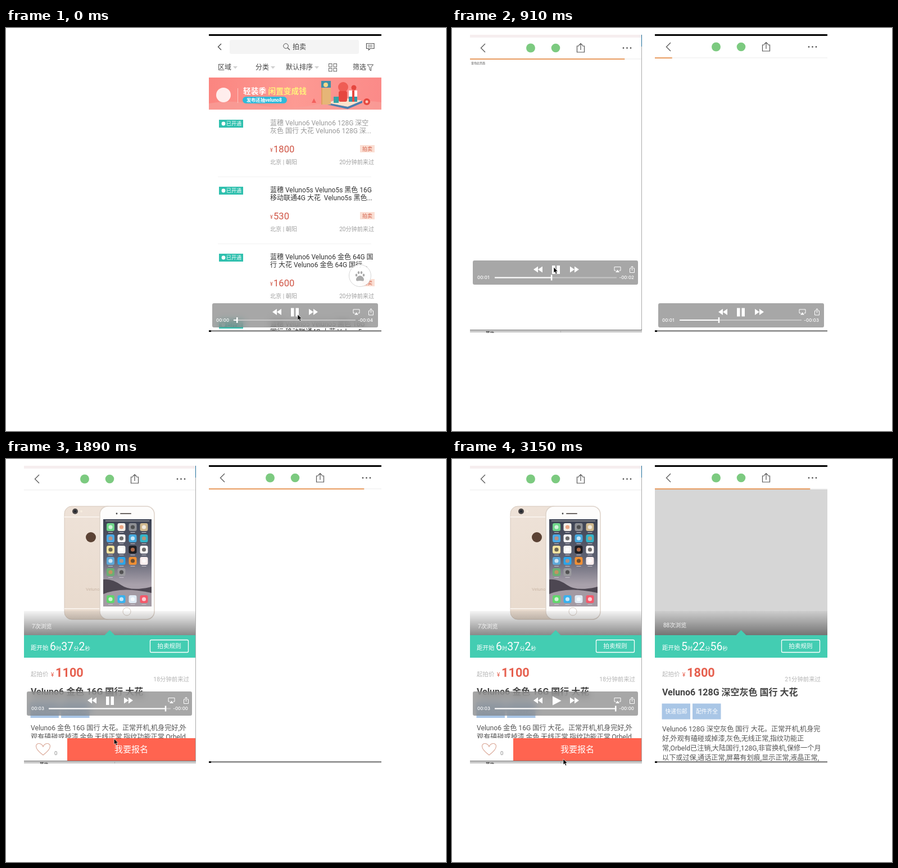
Animation, 783 px wide and 716 px high, one loop 4.15 s. Source, as an HTML page:

```html
<!DOCTYPE html>
<html lang="zh-CN">
<head>
<meta charset="utf-8">
<title>拍卖页面加载对比</title>
<style>
  html, body { margin: 0; width: 100%; height: 100%; overflow: hidden; background: #fff; }
  svg { position: absolute; left: 0; top: 0; display: block; }
  text { font-family: Roboto, 'Noto Sans CJK SC', 'Noto Sans CJK', sans-serif; white-space: pre; }
  .time { font-family: Inter, Roboto, sans-serif; font-weight: 500; }
  .glass { position: absolute; width: 294px; height: 43px; border-radius: 3px;
    background: rgba(118, 118, 118, .64); backdrop-filter: blur(7px); }
</style>
</head>
<body>
<svg id="back" width="783" height="716" viewBox="0 0 783 716"></svg>
<div class="glass" id="glassL" style="left:37px;top:413px"></div>
<div class="glass" id="glassR" style="left:366.5px;top:488.5px;width:295.5px"></div>
<svg id="front" width="783" height="716" viewBox="0 0 783 716"></svg>
<script>
const LOOP = 4150, STEP = 70, W = 307;
const $ = id => document.getElementById(id);

// Shape helpers; text takes the vertical centre of its line
const T = (x, y, size, fill, str, extra = '') =>
  `<text x="${x}" y="${(y + size * .37).toFixed(2)}" font-size="${size}" fill="${fill}" ${extra}>${str}</text>`;
const R = (x, y, w, h, fill, extra = '') =>
  `<rect x="${x}" y="${y}" width="${w}" height="${h}" fill="${fill}" ${extra}/>`;
const C = (x, y, r, fill, extra = '') => `<circle cx="${x}" cy="${y}" r="${r}" fill="${fill}" ${extra}/>`;
const P = (d, fill, extra = '') => `<path d="${d}" fill="${fill}" ${extra}/>`;
const L = (d, color, w = 1.2) => P(d, 'none', `stroke="${color}" stroke-width="${w}"`);
const G = (x, y, body, extra = '') => `<g transform="translate(${x} ${y})" ${extra}>${body}</g>`;
const END = 'text-anchor="end"', MID = 'text-anchor="middle"', BOLD = 'font-weight="700"';

// Listing screen
function banner() {
  return R(0, 88, W, 57, 'url(#pink)') +
    P('M0 145V134Q45 126 90 137T190 136T307 132V145Z', '#f8a09a', 'opacity=".7"') +
    C(26, 119, 13, '#fff', 'opacity=".85"') + L('M51.5 107V133', '#fdc5bf', 1) +
    T(61, 112, 13.7, '#fff', '轻装季 <tspan fill="#fff07c">闲置变成钱</tspan>', BOLD) +
    R(60, 122, 79, 12, '#2fb9d9', 'rx="6"') + T(67, 128, 8.3, '#fff', '发布还抽veluno8', BOLD) +
    P('M183 133l4-8 4 8z', '#f2605c') +
    P('M211 133l26-9 36 5-26 11z', '#fbe3cd') + P('M211 133l36 7 26-11v4l-26 11-36-8z', '#4b7fae') +
    L('M201 136V96H216', '#d9a04e', 1.5) + R(202, 107, 15, 29, '#e6b577') + R(200, 94, 17, 12, '#3f8fa8') +
    C(208, 101, 4, '#f7d98a') + C(239, 105, 9, '#ef5d55') + R(231, 112, 15, 19, '#e6473f', 'rx="3"') +
    R(222, 122, 9, 11, '#35a3a5') + R(249, 111, 15, 11, '#fff') + R(249, 122, 15, 9, '#2f98a8') +
    R(255, 111, 4, 20, '#e6473f') + C(258, 106, 4.5, '#e6473f') +
    C(281, 131, 6, '#e6473f') + C(281, 131, 2.5, '#f9c3b6');
}

function item(i, first, second, price) {
  const ink = i ? '#333' : '#999';
  return G(0, i * 119,
    R(18, 163, 43, 14, '#2fc0ae') + C(26, 170, 3.4, '#fff') + T(31, 170, 9, '#fff', '已开通') +
    T(109, 169, 12, ink, first) + T(109, 183, 12, ink, second) +
    T(109, 217, 9, '#cf5444', '¥') + T(115, 215, 16.6, '#cf5444', price) +
    R(269, 208, 26, 13, '#fbdfd4') + T(282, 214.5, 9, '#d2624b', '拍卖', MID) +
    T(109, 238, 10.1, '#a0a0a0', '北京 | 朝阳') + T(294, 238, 10.1, '#a0a0a0', '20分钟前来过', END) +
    R(16, 264, 273, 1, '#f2f2f2'));
}

function listing() {
  const caret = x => P(`M${x - 4} 68h8l-4 4.5z`, '#d0d0d0');
  const cell = (x, y) => R(x, y, 5.5, 5.5, 'none', 'stroke="#666"');
  const paw = C(269, 440, 19.5, '#fff', 'stroke="#d2d2d2" opacity=".93"') +
    P('M269 440c4 0 7 4 7 7 0 4-4 2-7 2s-7 2-7-2c0-3 3-7 7-7z', '#aaa') +
    [[-6.5, -1], [-2.5, -5.5], [2.5, -5.5], [6.5, -1]]
      .map(([x, y]) => `<ellipse cx="${269 + x}" cy="${440 + y}" rx="1.8" ry="2.6" fill="#aaa"/>`).join('');
  return R(0, 12, W, 525, '#fff') + L('M22 28l-5.500 5.500 5.500 5.500', '#444', 1.3) +
    R(37, 21, 230, 25, '#f4f4f4', 'rx="3"') + C(137, 32, 4.3, 'none', 'stroke="#555"') +
    L('M140 35l4 4', '#555') + T(149, 33.5, 12, '#444', '拍卖') +
    L('M280.500 27.500h13.500v9h-7l-2.500 2.500v-2.500h-4zM283 30.500h8M283 33.500h8', '#555') +
    T(16, 70, 12, '#444', '区域') + caret(47) + T(83, 70, 12, '#444', '分类') + caret(114) +
    T(137, 70, 12, '#444', '默认排序') + caret(192) +
    cell(213.5, 63.5) + cell(222, 63.5) + cell(213.5, 71.5) + cell(222, 71.5) +
    T(256, 70, 12, '#444', '筛选') + L('M282 65h10.500l-4 5v6l-2.500-2v-4z', '#555', 1) + banner() +
    item(0, '蓝穗 Veluno6 Veluno6 128G 深空', '灰色 国行 大花 Veluno6 128G 深...', '1800') +
    item(1, '蓝穗 Veluno5s Veluno5s 黑色 16G', '移动联通4G 大花  Veluno5s 黑色...', '530') +
    item(2, '蓝穗 Veluno6 Veluno6 金色 64G 国', '行 大花 Veluno6 金色 64G 国行...', '1600') +
    item(3, '蓝穗 Veluno5 Veluno5 黑色 16G', '国行 移动联通4G 大花 Veluno5...', '600') + paw;
}

// Web page parts
function nav() {
  return L('M28 26l-7.500 7.500 7.500 7.500', '#555', 1.3) + C(109, 33.5, 8, '#7cca80') + C(153.5, 33.5, 7.8, '#7cca80') +
    L('M195 30h-3.500v11h13v-11h-3.500M198 37v-11M194.500 29l3.500-3.500 3.500 3.500', '#555', 1.2) +
    [274, 280.5, 287].map(x => C(x, 33.5, 1.3, '#444')).join('') + R(0, 52.5, W, 1, '#ececec');
}

function phone() {
  const colors = ['#6fd68a', '#f3efe9', '#8e9094', '#cfb98f', '#4aa9e6', '#f5f5f5', '#45a8dd', '#32b5c9',
    '#f4e3a0', '#f7f7f4', '#1d1d22', '#faf6f4', '#5fa9d8', '#2aa5ea', '#ef8f35', '#f9eeee', '#6cae74', '#9a9a9e'];
  const dock = ['#62d66c', '#39b1ee', '#dfeaf4', '#f4596b'];
  const marks = ['#fff', '#e8895a', '#333'];
  const xs = [186, 205.5, 225.5, 245.5];
  const app = (x, y, c, mark) => R(x - 7, y - 7, 14, 14, c, 'rx="3.2"') +
    C(x, y, 3.6, mark, 'opacity=".7"') + R(x - 4, y + 9, 8, 1, '#c8c4cc');
  return R(104, 84, 90, 201, 'url(#gold)', 'rx="13" stroke="#d6c8bc"') +
    R(104, 102, 90, 2, '#f8f1eb') + R(104, 265, 90, 2, '#f8f1eb') +
    C(123, 93, 5, '#4b4747') + C(123, 93, 2.3, '#22262f') + C(134, 93, 2, '#f7eee0') +
    C(151, 139, 9, '#5b4234') + T(142, 231, 8, '#c9b6a6', 'Veluno') +
    R(167, 84, 97, 201, '#fdfcfb', 'rx="14" stroke="#ddd2c9" stroke-width="1.500"') +
    R(203, 96, 20, 2, '#6b6663', 'rx="1"') + C(197, 97, 1.4, '#444') +
    R(173, 107, 86, 155, 'url(#screen)') + P('M173 214Q188 212 205 224T259 227V262H173Z', '#4d4752') +
    P('M173 240Q205 226 259 238V262H173Z', '#a39aa3') + R(177, 109.5, 78, 1, '#bbb') +
    colors.map((c, i) => app(xs[i % 4], 121 + 20 * (i >> 2), c, marks[i % 3])).join('') +
    dock.map((c, i) => app(xs[i], 249, c, '#fff')).join('') + C(215, 271, 7, '#fff', 'stroke="#d6cbc2"');
}

function detail(s, o) {
  const big = n => `<tspan font-size="19.500" id="${n}"></tspan>`;
  const info = R(0, 313, W, 224, '#fff') + R(0, 313, W, 40, '#43cdb2') + P('M144 313.500l9.500-9.500 9.500 9.500z', '#43cdb2') +
    T(13, 335, 10.5, '#fff', '距开始') +
    `<text x="47" y="339.500" font-size="9.300" fill="#fff">${big('h' + s)}时${big('m' + s)}分${big('s' + s)}秒</text>` +
    R(225.5, 321.5, 68, 22, 'none', 'rx="2" stroke="#fff" stroke-width="1.300"') + T(259.5, 332, 10.6, '#fff', '拍卖规则', MID) +
    T(13, 382.5, 10.5, '#b5b5b5', '起拍价') + T(49, 383, 10, '#e6604f', '¥') +
    T(57, 379, 21.7, '#e6604f', o.price, BOLD) + T(295, 391, 10.4, '#b5b5b5', o.seen, END) +
    T(13, o.y + 414, 16, '#444', o.title, BOLD) +
    ['快递包邮', '配件齐全'].map((t, i) => R(12.5 + 54.5 * i, o.tag, 50.5, 28, '#a9c6e6') +
      T(38 + 54.5 * i, o.tag + 14, 9.8, '#fff', t, MID)).join('') +
    o.lines.map((t, i) => T(13, o.text + o.lead * i, 12.15, '#555', t)).join('');
  const bare = R(0, 313, W, 224, '#fff') +
    T(13, 390.5, 10.6, '#444', '请使用<tspan fill="#7fa6cf">速圆担保交易</tspan>') +
    C(115, 391.5, 5, 'none', 'stroke="#666" stroke-width=".9"') + T(115, 391.5, 8, '#555', '?', MID) + R(0, 408, 301, 10, '#f5f5f5');
  return `<g id="detail${s}">` + R(0, 54 + o.dy, W, 260, '#d6d6d6') +
    (s === 'L' ? `<g id="photo">${R(0, 54, W, 260, '#fff')}${G(-31, 0, phone())}</g>` : '') +
    R(0, 270, W, 43, 'url(#shade)') + T(15, 295.5 + o.dy, 10, '#f4f4f4', `<tspan id="views${s}"></tspan>次浏览`) +
    `<g id="bare${s}">${bare}</g><g id="info${s}">${info}</g></g>`;
}

function pane(s, x, o) {
  const loader = R(0, 11, W, 527, o.bg) + o.mascot + T(153.5, o.loadY, 11.8, '#aaa', '努力加载中...', MID);
  return `<g id="pane${s}" clip-path="url(#clip${s})">` + G(x, 0,
    `<g id="slide${s}">${G(0, o.dy, '<use href="#listing"/>')}${G(W, 0, loader)}</g>` +
    `<g id="web${s}">${R(0, 14 + o.dy * 1.5, W, 524, '#fff')}${o.extra}${detail(s, o)}` +
    G(0, o.dy, `<g id="nav${s}">${nav()}</g><rect id="bar${s}" x="0" y="52.200" height="2" fill="#e8995c"/>`) +
    `</g>${o.over}`) + '</g>';
}

const balls = [['#5cc25a', -90], ['#f2c643', -169], ['#5fd3ea', -11]];
const left = {
  bg: '#f6eeef', dy: 2, loadY: 308, y: -1, tag: 432, text: 477, lead: 16,
  price: '1100', seen: '18分钟前来过', title: 'Veluno6 金色 16G 国行 大花',
  lines: ['Veluno6 金色 16G 国行 大花。正常开机,机身完好,外', '观有磕碰或掉漆,金色,无线正常,指纹功能正常,Orbeld',
    '已注销,大陆国行,16G,非官换机,保修一个月以下或过', '保,通话正常,屏幕完好,轻微色差,液晶正常,无拆机无维'],
  mascot: C(153, 268, 20, '#ee5d55') + '<g id="balls">' + balls.map(([c, a]) =>
    C(153 + 21 * Math.cos(a * Math.PI / 180), 261 + 21 * Math.sin(a * Math.PI / 180), 2.8, c)).join('') + '</g>',
  extra: T(3, 62, 5, '#555', '查找此页面'),
  over: '<g id="signup">' + R(0, 496, 78, 41, '#fff') + R(78, 496, 229, 41, '#ff6450') +
    P('M35 526C16 512 23 505 28 505.500 32 506 34 508.500 35 511 36 508.500 38 506 42 505.500 47 505 54 512 35 526Z',
      'none', 'stroke="#d9a594" stroke-width="1.100"') +
    T(55, 522, 9.5, '#888', '0') + T(192, 515.5, 15, '#fff', '我要报名', MID) + '</g>'
};
const right = {
  bg: '#eee', dy: 0, loadY: 299, y: 0, tag: 434.5, text: 479.5, lead: 17,
  price: '1800', seen: '21分钟前来过', title: 'Veluno6 128G 深空灰色 国行 大花',
  lines: ['Veluno6 128G 深空灰色 国行 大花。正常开机,机身完', '好,外观有磕碰或掉漆,灰色,无线正常,指纹功能正',
    '常,Orbeld已注销,大陆国行,128G,非官换机,保修一个月', '以下或过保,通话正常,屏幕有划痕,显示正常,液晶正常,'],
  mascot: C(154, 263, 17, '#e4ebf5') + C(154, 266, 14, '#e14b2d'), extra: '', over: ''
};

const stop = (at, c, o = 1) => `<stop offset="${at}" stop-color="${c}" stop-opacity="${o}"/>`;
const ramp = (id, dir, stops) => `<linearGradient id="${id}" x2="${1 - dir}" y2="${dir}">${stops}</linearGradient>`;
$('back').innerHTML = '<defs>' +
  ramp('pink', 0, stop(0, '#fb8580') + stop(.5, '#fd9a93') + stop(1, '#fb8a88')) +
  ramp('screen', 1, stop(0, '#3c4252') + stop(.45, '#5f6272') + stop(.75, '#a9a1ab')) +
  ramp('gold', 1, stop(0, '#eee2d8') + stop(1, '#e8dacd')) +
  ramp('shade', 1, stop(0, '#000', .04) + stop(1, '#000', .46)) +
  ramp('edge', 1, stop(0, '#666') + stop(1, '#ccc')) +
  `<clipPath id="clipL">${R(32, 12, 305, 524, '#000')}</clipPath>` +
  `<clipPath id="clipR">${R(361, 14, 307, 523, '#000')}</clipPath>` +
  `<clipPath id="clipS">${R(32, 536, 306, 5.5, '#000')}</clipPath>` +
  `<g id="listing">${listing()}</g></defs>` +
  '<g id="frameL">' + R(336.5, 12, 1.5, 525, '#aaa') + R(336.5, 12, 1.5, 21, '#1f6f9a') + R(32, 536, 306, 5, '#c9c9c9') +
  R(32, 535.5, 306, 1.5, '#777') + R(193, 538, 1, 3, '#aaa') +
  `<g clip-path="url(#clipS)">${T(60, 543.5, 7.5, '#222', '其他', BOLD)}</g></g>` +
  pane('L', 31, left) + pane('R', 361, right) +
  R(361, 11, W, 3, '#000') + R(361, 537, W, 3, 'url(#edge)') + R(361, 537, 4, 3, '#111');

// Video controls
function player(s, x, y) {
  const tri = (a, d) => P(`M${a} 10.500v11l${8 * d}-5.500z`, '#fff');
  return G(x, y, tri(116, -1) + tri(124, -1) + tri(173, 1) + tri(181, 1) +
    `<g id="pause${s}">${R(141, 9, 5.5, 15, '#fff')}${R(149.500, 9, 5.5, 15, '#fff')}</g>` +
    `<g id="play${s}">${P('M142 8.500v16l15.500-8z', '#fff')}</g>` +
    L('M254.500 18h-2.500v-6.500h11v6.500h-2.500', '#fff', 1) + P('M254 21l3.500-4.500 3.500 4.500z', '#fff') +
    L('M282 14h-2.500v7.500h8v-7.500h-2.500M283.500 18v-7M281 12.500l2.500-2.500 2.500 2.500', '#fff', 1) +
    T(8, 30.5, 8, '#fff', '', `class="time" id="now${s}"`) + T(287, 30.5, 8, '#fff', '', `class="time" ${END} id="rest${s}"`) +
    R(39, 29.5, 217, 2, '#c6c6c6') + `<rect id="done${s}" x="39" y="29.500" height="2" fill="#fff"/>` +
    `<rect id="knob${s}" y="25.500" width="2.500" height="10" fill="#fff"/>`, `id="player${s}"`);
}
const cursor = id => `<path id="${id}" d="M0 0v10l2.300-2 1.700 3.800 1.800-.8-1.700-3.600h3.200z" fill="#000" stroke="#fff" stroke-width=".6"/>`;
$('front').innerHTML = player('L', 37, 413) + player('R', 366, 488.5) + cursor('curL') + cursor('curR');

const show = (id, on) => { $(id).style.display = on ? '' : 'none'; };
const set = (id, attr, v) => $(id).setAttribute(attr, v);
const move = (id, x, y) => set(id, 'transform', `translate(${x} ${y})`);
const slide = (t, start) => W * (1 - Math.exp(-Math.max(0, t - start) / 79));
const clock = s => '00:0' + s;

function seek(s, px, total) {
  const p = Math.min(px, 215), sec = p / 215 * total;
  set('done' + s, 'width', p);
  set('knob' + s, 'x', 38 + p);
  $('now' + s).textContent = clock(Math.floor(sec));
  $('rest' + s).textContent = '-' + clock(Math.round(total - sec));
  show('pause' + s, p < 215);
  show('play' + s, p >= 215);
}

function load(s, t, k) {
  move('slide' + s, -slide(t, k.push), 0);
  show('web' + s, t >= k.web);
  show('nav' + s, t >= k.nav);
  show('bar' + s, t >= k.nav && t < k.done);
  set('bar' + s, 'width', W * (t < k.jump ? .1 : .9));
  show('detail' + s, t >= k.detail);
  show('bare' + s, t < k.info);
  show('info' + s, t >= k.info);
  $('views' + s).textContent = t < k.info ? '' : k.views;
  ['h', 'm', 's'].forEach((u, i) => { $(u + s).textContent = k.left[i]; });
}

function draw(time) {
  const t = Math.floor(time / STEP) * STEP;
  const on = t >= STEP;
  ['frameL', 'paneL', 'glassL', 'playerL', 'curL'].forEach(id => show(id, on));
  load('L', t, { push: -65, web: 420, nav: 420, jump: 700, detail: 1190, info: 1260, done: 1820,
    views: 7, left: [6, 37, t < 1890 ? 3 : 2] });
  load('R', t, { push: 0, web: 490, nav: 700, jump: 1260, detail: 2730, info: 2870, done: Infinity,
    views: 88, left: [5, 22, t < 3150 ? 57 : 56] });
  show('photo', t >= 1820);
  show('signup', t >= 1890);
  set('balls', 'transform', `rotate(${(t - 140) * .4} 153 261)`);

  seek('L', 17 + (t - 140) * .109, 3.5);
  seek('R', 6 + t * .07, 4.4);
  show('glassR', t < 1050);
  show('playerR', t < 1050);
  show('curR', t < 630);
  move('curR', 519, 509);
  const k = Math.min(1, Math.max(0, (t - 1750) / 210));
  move('curL', 181 + 17 * k, 425 + 108 * k);
}

const begin = performance.now();
function tick() {
  draw((performance.now() - begin) % LOOP);
  requestAnimationFrame(tick);
}
tick();
</script>
</body>
</html>
```
